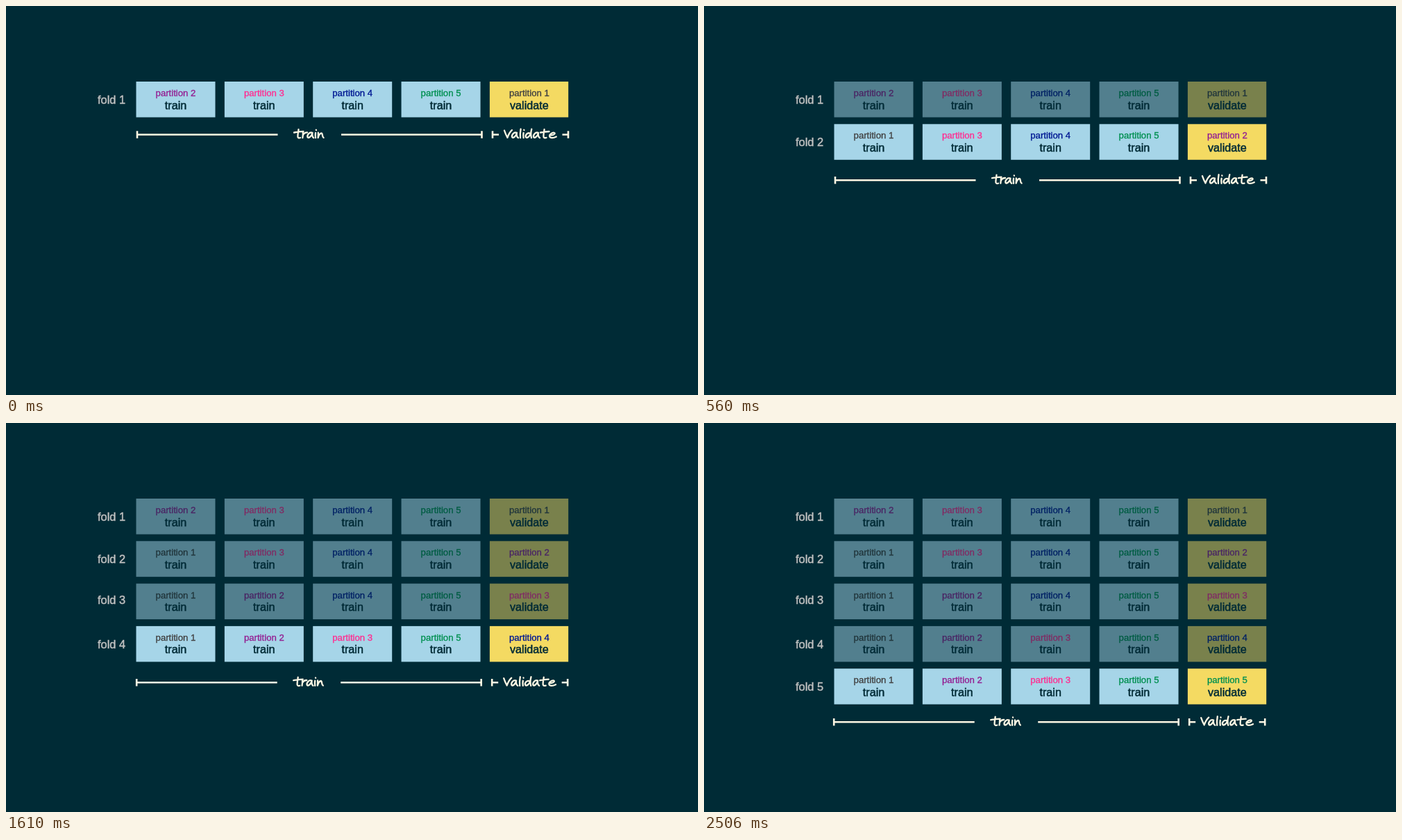
Recreate the animation shown at these times as an HTML page with a canvas. Size 997x561 px, loop 2730 ms.

```html
<!DOCTYPE html>
<html lang="en">
<head>
<meta charset="utf-8">
<title>Cross-validation folds</title>
<style>
  html, body { margin: 0; width: 100%; height: 100%; overflow: hidden; background: #002b36; }
  canvas { display: block; }
</style>
</head>
<body>
<canvas id="stage" width="997" height="561"></canvas>
<script>
const ctx = document.getElementById('stage').getContext('2d');

const LOOP = 2730;
const STARTS = [0, 560, 1120, 1610, 2170];
const BG = '#002b36', BLUE = '#a6d5e8', YELLOW = '#f4da62', CREAM = '#fdf6e3', GREY = '#c0c0c0';
const PARTITION_COLORS = ['#424242', '#942193', '#ff2f92', '#011993', '#009051'];

// The last entry of each row is the validation partition.
const FOLDS = [
  [2, 3, 4, 5, 1],
  [1, 3, 4, 5, 2],
  [1, 2, 4, 5, 3],
  [1, 2, 3, 5, 4],
  [1, 2, 3, 5, 5]
];
const LABEL_Y = [140.5, 202, 260.5, 324.5, 385.5];
const BRACKETS = [[0, 185.5], [0, 251.2], [0, 313.2], [-0.8, 374.2], [-1.8, 431.2]];

const BOX = { x: 187.5, y: 109, w: 114, h: 51.5, stepX: 127.35, stepY: 61.3 };

// Handwritten words, drawn as pen strokes around the bracket line at y = 0.
const TRAIN = new Path2D(
  'M421.5 -7.5 C421 -3 420 1 420.5 3.5 Q421.3 5.6 424 4.5 M415 -3 Q421 -4.2 428.5 -4.6' +
  'M427.8 -3 Q428 1 427.3 4.5 M427.8 .5 Q430 -3.5 434 -3.2' +
  'M441.5 -2.6 C437 -4.5 433.5 1 434.5 3.6 C436 6 440.5 2 441.3 -2 Q440.8 3 443.2 4.6' +
  'M446 -2.5 Q445.4 1 446 4.6 M446.8 -6.8 L446.9 -6.5' +
  'M449.8 -2.8 Q450 1 449.6 4.5 Q451.5 -2 454.5 -2.2 C456.5 -2 455 3 457.6 4.4');
const VALIDATE = new Path2D(
  'M718 -6 Q720 0 722.5 4.3 Q725 -3 729 -6.6' +
  'M736 -2.6 C731.5 -4.5 728.2 1 729.2 3.6 C730.8 6 735 2 735.8 -2 Q735.3 3 738 4.6' +
  'M741.6 -8 Q740.4 -1 741 4.6 M745.6 -2.5 Q745 1 745.6 4.6 M746.3 -6.8 L746.4 -6.5' +
  'M755.5 -1.6 C751 -4 747.8 1 749 3.6 C750.8 6 755 2 756 -2 M757.3 -8 Q755.4 -1 757 4.6' +
  'M767 -2.6 C762.5 -4.5 759.2 1 760.2 3.6 C761.8 6 766 2 766.8 -2 Q766.3 3 769 4.6' +
  'M775.6 -7.5 C775 -3 774 1 774.6 3.5 Q775.5 5.4 778.5 4.4 M770 -3 Q776 -4.2 782.5 -4.5' +
  'M783.4 1.2 Q791 .4 790.7 -2 C789.5 -4.5 782.6 -1 783.2 2.5 C784 5.6 789 5 792.8 3');

function drawText(text, x, y, size, color, align = 'center', weight = 0.35) {
  ctx.font = `${size}px "Liberation Sans", Arial, sans-serif`;
  ctx.textAlign = align;
  ctx.fillStyle = ctx.strokeStyle = color;
  ctx.lineWidth = weight;
  ctx.fillText(text, x, y);
  ctx.strokeText(text, x, y);
}

function drawCell(row, col, dimmed) {
  const x = BOX.x + col * BOX.stepX, y = BOX.y + row * BOX.stepY;
  const mid = x + BOX.w / 2;
  const partition = FOLDS[row][col];
  const validating = col === 4;
  ctx.fillStyle = validating ? YELLOW : BLUE;
  ctx.fillRect(x, y, BOX.w - (validating ? 0.7 : 0), BOX.h);
  drawText(`partition ${partition}`, mid, y + 21, 13.2, PARTITION_COLORS[partition - 1]);
  drawText(validating ? 'validate' : 'train', mid, y + 39.5, 16.2, BG, 'center', 0.5);
  if (dimmed) {
    ctx.fillStyle = BG + '80';
    ctx.fillRect(x - 1, y - 1, BOX.w + 2, BOX.h + 2);
  }
}

function drawBracket(left, gapStart, gapEnd, right, word) {
  ctx.lineWidth = 2.6;
  ctx.lineCap = 'butt';
  ctx.beginPath();
  ctx.moveTo(left, 0);
  ctx.lineTo(gapStart, 0);
  ctx.moveTo(gapEnd, 0);
  ctx.lineTo(right, 0);
  for (const x of [left, right]) {
    ctx.moveTo(x, -5.3);
    ctx.lineTo(x, 5.3);
  }
  ctx.stroke();
  ctx.lineWidth = 2.3;
  ctx.lineCap = ctx.lineJoin = 'round';
  ctx.stroke(word);
}

function draw(time) {
  const current = STARTS.findLastIndex(start => time >= start);
  ctx.fillStyle = BG;
  ctx.fillRect(0, 0, 997, 561);
  for (let row = 0; row <= current; row++) {
    drawText(`fold ${row + 1}`, 132, LABEL_Y[row], 16.4, GREY, 'left', 0.45);
    for (let col = 0; col < 5; col++) drawCell(row, col, row < current);
  }
  ctx.save();
  ctx.translate(...BRACKETS[current]);
  ctx.strokeStyle = CREAM;
  drawBracket(189, 391.5, 483, 685.5, TRAIN);
  drawBracket(701, 710, 801.5, 810, VALIDATE);
  ctx.restore();
}

const origin = performance.now();
function tick() {
  draw((performance.now() - origin) % LOOP);
  requestAnimationFrame(tick);
}
tick();
</script>
</body>
</html>
```
